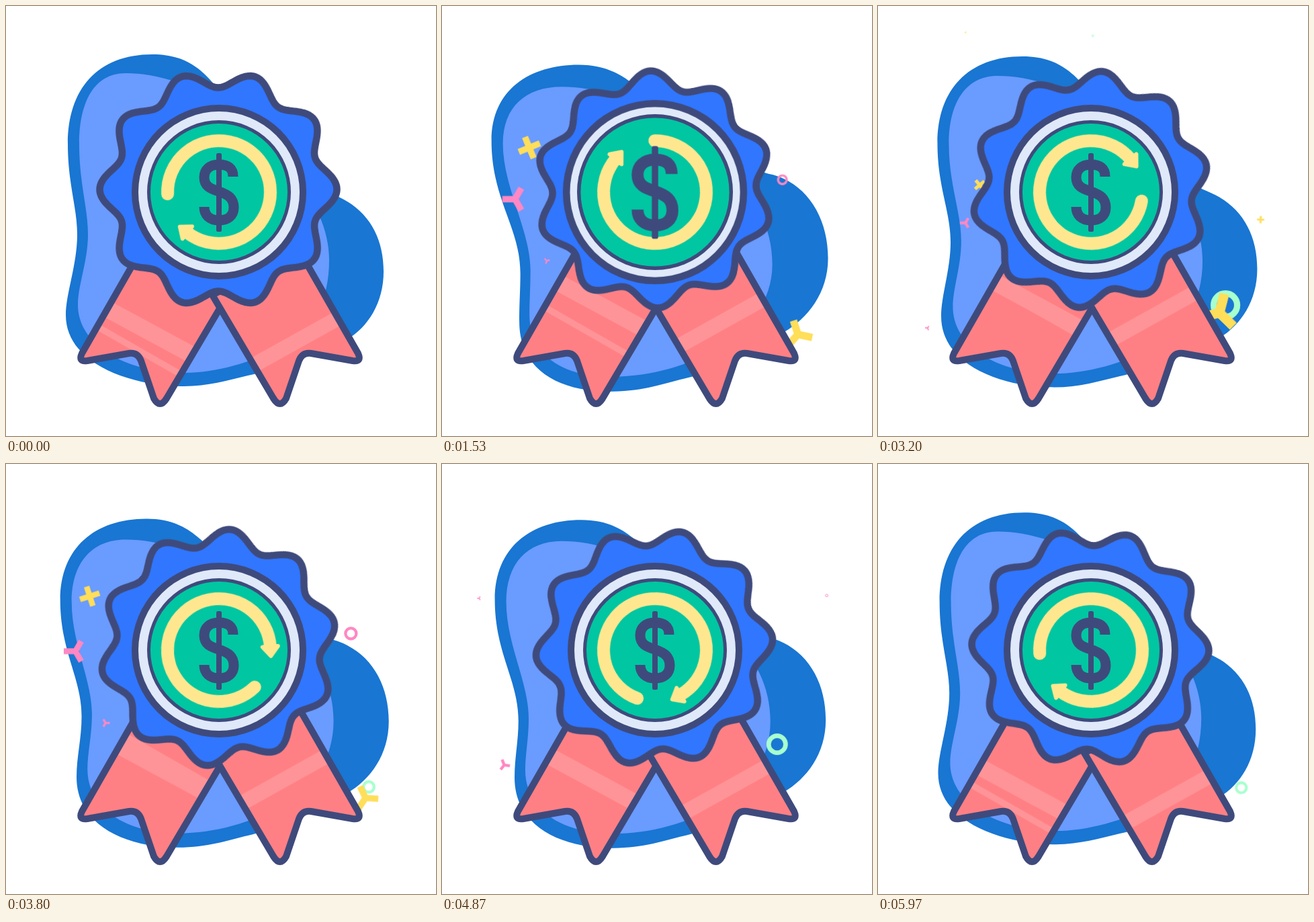
An HTML page for the animation above (6 s loop, 640 by 640 pixels).

```html
<!DOCTYPE html>
<html lang="en">
<head>
<meta charset="utf-8">
<title>Award badge</title>
<style>
html, body { margin: 0; width: 100%; height: 100%; overflow: hidden; background: #fff; }
svg { display: block; width: 100vw; height: 100vh; }
svg * { animation: 6s linear infinite; }

.blob { fill: #1976d2; animation-name: blob; }
.core { fill: #6a9bff; animation-name: core; }
@keyframes blob {
  0%, 48.8%, 100% { d: path("M218 72C278 72 300 105 325 135C365 185 420 250 495 284C540 305 562 345 562 395C562 450 530 490 490 505C440 522 400 542 360 550C330 557 300 566 265 566C185 566 89 532 89 460C89 428 106 385 106 340C106 300 92 265 92 205C92 125 135 72 218 72Z"); }
  26.4%, 73.3% { d: path("M203 88C250 88 275 108 300 130C345 175 420 235 493 250C545 265 575 315 575 375C575 430 540 470 500 490C440 522 400 546 360 555C330 562 300 574 250 574C170 574 116 540 116 470C116 440 117 425 117 400C117 330 73 290 73 200C73 125 130 88 203 88Z"); }
}
@keyframes core {
  0%, 48.8%, 100% { d: path("M178 100C225 100 290 118 345 165C400 215 481 290 481 378C481 440 455 480 430 495C385 525 320 546 265 546C180 546 107 505 107 445C107 415 122 380 122 340C122 300 109 265 109 205C109 145 130 100 178 100Z"); }
  26.4%, 73.3% { d: path("M178 121C225 121 275 135 330 180C385 215 492 270 492 385C492 440 455 480 430 495C385 530 320 552 250 552C180 552 131 520 131 460C131 440 132 420 132 395C132 335 90 270 90 205C90 150 125 121 178 121Z"); }
}

.cloth { fill: #ff8084; }
.edge { fill: none; stroke: #3f4a7c; stroke-width: 10; stroke-linejoin: round; }
.band { stroke: #ff9498; }
.wide { stroke-width: 25; animation-name: wide; }
.thin { stroke-width: 9.5; animation-name: thin; }
.right { stroke-width: 22.5; animation-name: right; }
@keyframes wide {
  25.5% { transform: translate(23px, -39px); }
  40% { transform: translate(36px, -62px); }
  53.3% { transform: translate(23px, -40px); }
}
@keyframes thin { 68.3% { transform: translate(45px, -78px); } }
@keyframes right {
  25.5% { transform: translate(-17px, -28px); }
  43% { transform: translate(-28px, -46px); }
}

.gear { fill: #3076ff; transform-origin: 316px 273px; animation-name: back; }
.arrow { transform-origin: 317px 277px; animation-name: turn; fill: none; stroke: #ffe78f; stroke-linecap: round; stroke-linejoin: round; }
@keyframes back { to { transform: rotate(-360deg); } }
@keyframes turn { from { transform: rotate(38deg); } to { transform: rotate(398deg); } }

.rim, .face, .sign { transform-origin: 317px 277px; }
.rim { animation-name: rim; }
.face { animation-name: face; }
.sign { animation-name: sign; }
@keyframes rim { 0%, 12%, 38%, 100% { transform: scale(1); } 25.5% { transform: scale(1.055); } }
@keyframes face { 0%, 15%, 43%, 100% { transform: scale(1); } 27.5% { transform: scale(1.1); } }
@keyframes sign { 0%, 12%, 38%, 100% { transform: scale(1); } 25.5% { transform: scale(1.18); } }
.dark { fill: #3f4a7c; }
</style>
</head>
<body>
<svg viewBox="0 0 640 640">
  <defs>
    <path id="ribbonL" d="M200 365L113 517Q107 530 121 528L183 517Q196 515 201 528L220 584Q229 600 239 584L330 430Z"/>
    <path id="ribbonR" d="M437 365L524 517Q530 530 516 528L454 517Q441 515 436 528L417 584Q408 600 398 584L307 430Z"/>
    <clipPath id="clipL"><use href="#ribbonL"/></clipPath>
    <clipPath id="clipR"><use href="#ribbonR"/></clipPath>
  </defs>

  <path class="blob"/>
  <path class="core"/>
  <g id="confetti"></g>

  <use class="cloth" href="#ribbonL"/>
  <g clip-path="url(#clipL)">
    <path class="band wide" d="M84 415L343 555"/>
    <path class="band thin" d="M70.500 440L322.500 584"/>
  </g>
  <use class="edge" href="#ribbonL"/>

  <use class="cloth" href="#ribbonR"/>
  <g clip-path="url(#clipR)">
    <path class="band right" d="M562 427L305 570"/>
  </g>
  <use class="edge" href="#ribbonR"/>

  <path class="gear" id="gear" stroke="#3f4a7c" stroke-width="10.500" stroke-linejoin="round"/>

  <g class="rim">
    <circle class="dark" cx="317" cy="277" r="130"/>
    <circle cx="317" cy="277" r="120" fill="#dfe9fa"/>
  </g>
  <g class="face">
    <circle class="dark" cx="317" cy="277" r="107"/>
    <circle cx="317" cy="277" r="102" fill="#00c6a2"/>
  </g>
  <g class="arrow">
    <path d="M258.400 326.200A76.500 76.500 0 1 1 317 353.500" stroke-width="19"/>
    <path d="M317 342V365L303 353.500Z" fill="#ffe78f" stroke-width="6"/>
  </g>
  <g class="sign">
    <rect class="dark" x="313" y="219" width="8" height="117" rx="2.500"/>
    <path d="M338 254C338 241 330 236 317 236C303 236 295 244 295 255C295 268 304 272 317 276C331 281 339 286 339 300C339 312 330 319 317 319C303 319 295 311 295 299" fill="none" stroke="#3f4a7c" stroke-width="15"/>
  </g>
</svg>

<script>
const LOOP = 6000, REPEAT = 2150;
const yellow = '#ffde59', pink = '#ff87c3', purple = '#b388ff', mint = '#a7ffce';

// Scalloped rosette with ten petals
let outline = '';
for (let i = 0; i < 360; i++) {
  const a = i * Math.PI / 180, r = 164 + 12.5 * Math.cos(10 * a);
  outline += `${i ? 'L' : 'M'}${(316 + r * Math.cos(a)).toFixed(2)} ${(273 + r * Math.sin(a)).toFixed(2)}`;
}
document.getElementById('gear').setAttribute('d', outline + 'Z');

// Unit shapes: [path, stroke width]
const shapes = {
  plus: ['M-1 0H1M0-1V1', .55],
  tri: ['M0 0H1M0 0L-.5 .866M0 0L-.5-.866', .5],
  ring: ['M.79 0A.79 .79 0 1 1-.79 0A.79 .79 0 1 1 .79 0Z', .42]
};

// shape, colour, runs, size, [birth, peak, death], [x, y, turn] at birth and death, optional [x, y] at peak
const pieces = [
  ['plus', yellow, 2, 21, [900, 1250, 2700], [158, 284, -45], [78, 75, 20]],
  ['tri', pink, 2, 22, [900, 1300, 2950], [137, 334, 180], [45, 183, 180]],
  ['tri', pink, 2, 14, [1200, 2200, 3550], [177, 362, -54], [60, 502, 228], [113, 414]],
  ['ring', pink, 2, 11, [1050, 1700, 3000], [480, 284, 0], [588, 181, 0]],
  ['ring', mint, 2, 22.5, [1600, 3180, 4300], [456, 351, 0], [559, 510, 0]],
  ['tri', yellow, 2, 32, [600, 1100, 2450], [488, 426, 75], [571, 551, -50]],
  ['tri', yellow, 1, 31, [1800, 2400, 3250], [200, 260, 30], [130, 32, -60], [133, 162]],
  ['ring', pink, 1, 12.5, [1800, 2400, 3000], [170, 260, 0], [50, 215, 0], [81, 223]],
  ['ring', pink, 1, 20.5, [1800, 2400, 3100], [410, 190, 0], [540, 70, 0], [490, 123]],
  ['plus', purple, 1, 20, [1800, 2400, 3100], [440, 220, 20], [572, 128, -30], [535, 155]],
  ['plus', yellow, 1, 22, [1800, 2400, 3460], [421, 323, 15], [597, 317, 0]],
  ['tri', mint, 1, 14, [2500, 2850, 3270], [318, 150, 0], [320, 34, 90]]
];

const mix = (a, b, k) => a + (b - a) * k;
const layer = document.getElementById('confetti');
let css = '', count = 0;

function addPiece([shape, color, , size, times, from, to, via], delay) {
  const [birth, peak, death] = times.map(t => t + delay);
  const k = (peak - birth) / (death - birth);
  const mid = from.map((v, i) => via && i < 2 ? via[i] : mix(v, to[i], k));
  const pose = t => {
    const rising = t < peak;
    const u = rising ? (t - birth) / (peak - birth) : (t - peak) / (death - peak);
    const c = Math.max(0, Math.min(1, u));
    const [x, y, r] = (rising ? from : mid).map((v, i) => mix(v, (rising ? mid : to)[i], c));
    const s = size * (rising ? c : 1 - c);
    return `translate(${x.toFixed(2)}px,${y.toFixed(2)}px) rotate(${r.toFixed(2)}deg) scale(${s.toFixed(3)})`;
  };
  const stops = [0, birth, peak, death, LOOP].filter(t => t <= LOOP);
  const name = 'piece' + count++;
  css += `@keyframes ${name}{${stops.map(t => `${(t / LOOP * 100).toFixed(3)}%{transform:${pose(t)}}`).join('')}}`;

  const el = document.createElementNS('http://www.w3.org/2000/svg', 'path');
  const [d, width] = shapes[shape];
  el.setAttribute('d', d);
  el.setAttribute('fill', 'none');
  el.setAttribute('stroke', color);
  el.setAttribute('stroke-width', width);
  el.style.animationName = name;
  layer.append(el);
}

for (const piece of pieces)
  for (let run = 0; run < piece[2]; run++) addPiece(piece, run * REPEAT);

const sheet = document.createElement('style');
sheet.textContent = css;
document.head.append(sheet);
</script>
</body>
</html>
```
